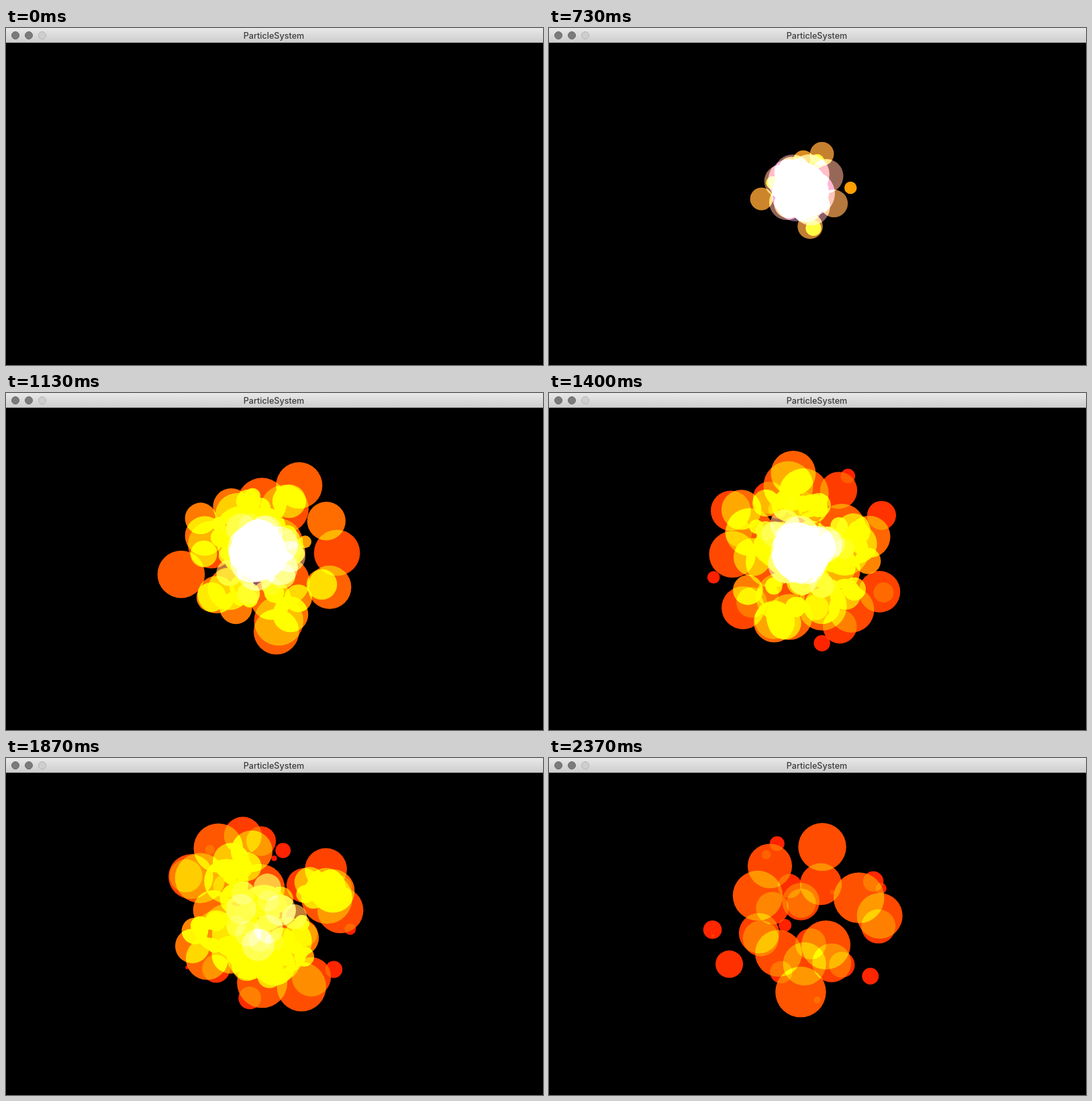
An HTML page with a canvas for the animation above (2.41 s loop, 800 by 502 pixels).

```html
<!DOCTYPE html>
<html lang="en">
<head>
<meta charset="utf-8">
<title>ParticleSystem</title>
<style>
  html, body { margin: 0; width: 100%; height: 100%; overflow: hidden; background: #000; }
  .window { position: relative; width: 800px; height: 502px; overflow: hidden; }
  canvas { position: absolute; left: 0; top: 0; }
  .bar {
    position: absolute; left: 0; top: 0; width: 800px; height: 22px; box-sizing: border-box;
    background: linear-gradient(#e8e8e8, #cecece); border-bottom: 1px solid #b4b4b4;
  }
  .bar i {
    position: absolute; top: 5px; width: 12px; height: 12px; box-sizing: border-box;
    border-radius: 50%; background: #7b7b7b; border: 1px solid #686868;
  }
  .bar i:nth-child(1) { left: 8px; }
  .bar i:nth-child(2) { left: 28px; }
  .bar i:nth-child(3) { left: 48px; background: #cecece; border-color: #b6b6b6; }
  .bar b {
    position: absolute; left: 0; top: 0; width: 798px; text-align: center;
    font: 500 12.6px/23px Inter, Roboto, sans-serif; color: #3c3c3c;
  }
</style>
</head>
<body>
<div class="window">
  <canvas width="800" height="502"></canvas>
  <div class="bar"><i></i><i></i><i></i><b>ParticleSystem</b></div>
</div>
<script>
const LOOP = 2410, STEP = 100 / 3, LAST = 71;
const START = 445, STOP = 1730, COUNT = 143;
const LIFE = 930, DRAG = 400, REACH = 158;
const CX = 376, CY = 238;
const GOLDEN = Math.PI * (3 - Math.sqrt(5));

// Ages at which a particle is smallest, then largest
const IGNITE = 285, PEAK = 640;
const SMALL = 9, LARGE = 38;
const SMOKE = [70, 60, 155], FLAME = [255, 160, 0], EMBER = [255, 20, 0];

const ctx = document.querySelector('canvas').getContext('2d');
const lerp = (a, b, f) => a + (b - a) * f;
const progress = (age, from, to) => (age - from) / (to - from);

let seed = 29;
const random = () => (seed = seed * 16807 % 2147483647) / 2147483647;

// Even stream of particles spread over a disc
const particles = Array.from({ length: COUNT }, (_, i) => {
  const angle = i * GOLDEN + random();
  const reach = REACH * Math.sqrt(random());
  return {
    born: lerp(START, STOP, i / (COUNT - 1)),
    dx: reach * Math.cos(angle),
    dy: reach * Math.sin(angle)
  };
});

function radius(age) {
  if (age < IGNITE) return lerp(LARGE, SMALL, progress(age, 0, IGNITE));
  if (age < PEAK) return lerp(SMALL, LARGE, progress(age, IGNITE, PEAK));
  return LARGE * (1 - progress(age, PEAK, LIFE) ** 1.3);
}

function colour(age) {
  const young = age < IGNITE;
  const [a, b] = young ? [SMOKE, FLAME] : [FLAME, EMBER];
  const f = young ? progress(age, 0, IGNITE) : progress(age, IGNITE, LIFE);
  return `rgb(${a.map((v, i) => Math.round(lerp(v, b[i], f)))})`;
}

function draw(t) {
  ctx.globalCompositeOperation = 'source-over';
  ctx.fillStyle = '#000';
  ctx.fillRect(0, 0, 800, 502);
  ctx.globalCompositeOperation = 'lighter';
  for (const { born, dx, dy } of particles) {
    const age = t - born;
    if (age < 0 || age >= LIFE) continue;
    const d = 1 - Math.exp(-age / DRAG);
    ctx.fillStyle = colour(age);
    ctx.beginPath();
    ctx.arc(CX + dx * d, CY + dy * d, radius(age), 0, Math.PI * 2);
    ctx.fill();
  }
}

const origin = performance.now();
function tick() {
  const t = (performance.now() - origin) % LOOP;
  draw(Math.min(LAST, Math.floor(t / STEP + 0.15)) * STEP);
  requestAnimationFrame(tick);
}
tick();
</script>
</body>
</html>
```
